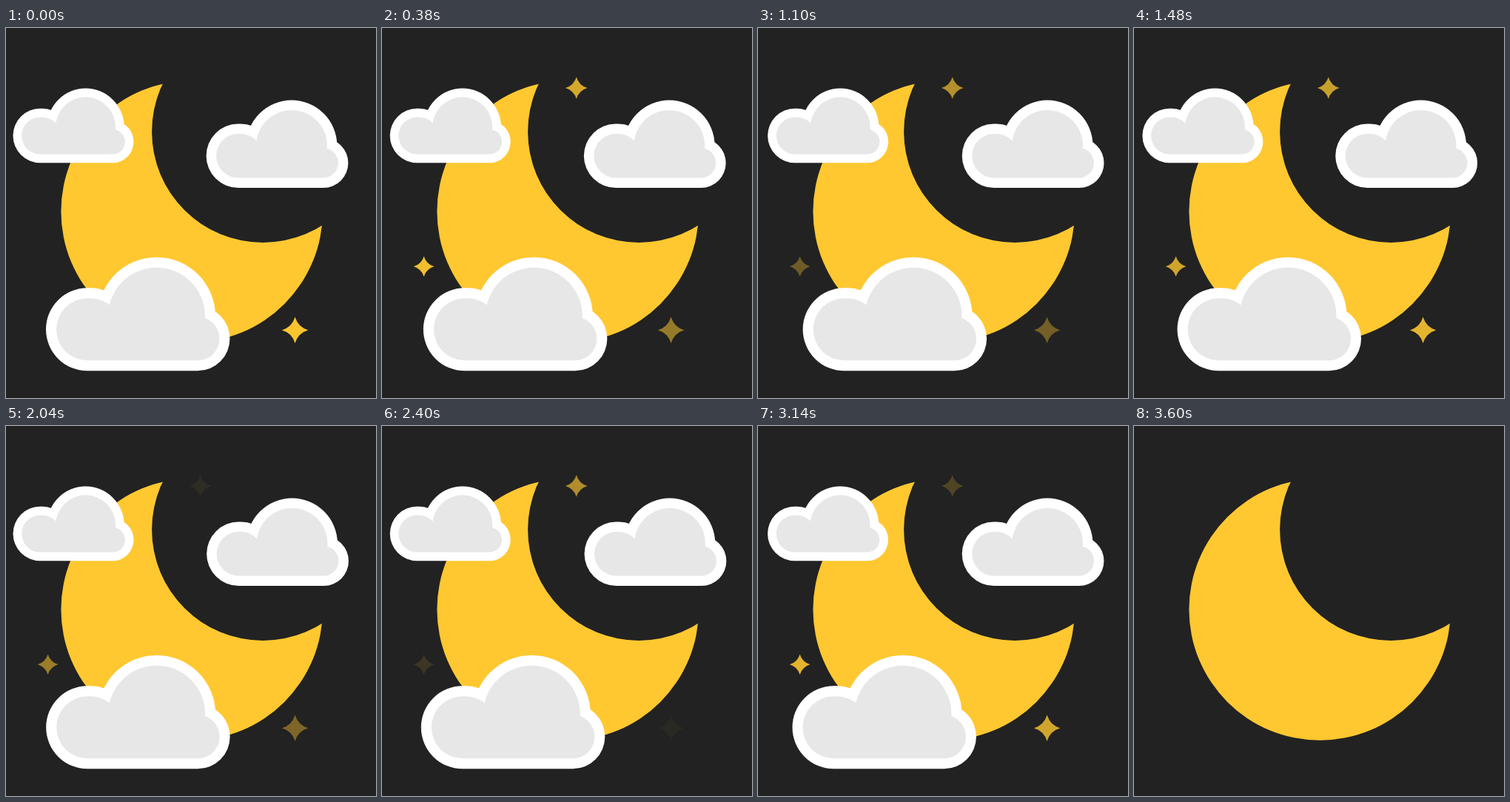
Write an HTML page with a canvas that moves like this. It is 500 px wide and 500 px high and loops after 3620 ms.

```html
<!DOCTYPE html>
<html lang="en">
<head>
<meta charset="utf-8">
<title>Moon and clouds</title>
<style>
  html, body { margin: 0; width: 100%; height: 100%; overflow: hidden; background: #222; }
  canvas { display: block; width: 500px; height: 500px; }
</style>
</head>
<body>
<canvas id="stage" width="500" height="500"></canvas>
<script>
const ctx = document.getElementById('stage').getContext('2d');
const LOOP = 3620, END = 3600, TAU = Math.PI * 2;
const NIGHT = '#222222', GOLD = '#ffc830';

// A cloud leaves home by `first`, is back at `rest`, leaves again by `second`.
const clouds = [
  { home: 9.5, bottom: 182.3, scale: 0.656, border: 11.7, rest: 1980, first: 3.7, second: 3.7 },
  { home: 270.6, bottom: 216, scale: 0.772, border: 13.5, rest: 1800, first: 5.8, second: 5.8 },
  { home: 54, bottom: 463.3, scale: 1, border: 14, rest: 2150, first: 6.6, second: -7.6 }
];

// A star flares once between neighbouring `dark` times, brightest at the `peak` fraction.
const stars = [
  { x: 390.6, y: 408.3, r: 17.7, peak: 0.48, dark: [-800, 830, 2370, 4400] },
  { x: 262.7, y: 81, r: 14.8, peak: 0.4, dark: [0, 740, 2090, 3290] },
  { x: 56.6, y: 322.2, r: 13.8, peak: 0.5, dark: [0, 810, 2500, 3640] }
];

// Eased trip out and back over 0..1, turning round at `peak`.
function swing(k, peak) {
  const leg = k < peak ? k / peak : (1 - k) / (1 - peak);
  return (1 - Math.cos(Math.PI * leg)) / 2;
}

function cloudX({ home, rest, first, second }, t) {
  return t < rest
    ? home + first * swing(t / rest, 1 / 2)
    : home + second * swing((t - rest) / (END - rest), 2 / 3);
}

function brightness({ dark, peak }, t) {
  const next = dark.findIndex(time => time > t);
  if (next < 1) return 0;
  const k = (t - dark[next - 1]) / (dark[next] - dark[next - 1]);
  return Math.min(k / peak, (1 - k) / (1 - peak));
}

function disc(x, y, r, color) {
  ctx.fillStyle = color;
  ctx.beginPath();
  ctx.arc(x, y, r, 0, TAU);
  ctx.fill();
}

function drawMoon() {
  disc(251.2, 247.9, 176.8, GOLD);
  disc(347.1, 140, 150, NIGHT);
}

function puff(x, y, r, from = 0, to = TAU) {
  ctx.moveTo(x + r * Math.cos(from), y + r * Math.sin(from));
  ctx.arc(x, y, r, from, to);
}

function fillCloud(x, bottom, s, inset, color) {
  const left = x + 56 * s, right = x + 205 * s, top = bottom - 74 * s;
  ctx.fillStyle = color;
  ctx.beginPath();
  puff(left, bottom - 56 * s, 56 * s - inset);
  puff(left + 4 * s, bottom - 56 * s, 56 * s - inset);
  puff(x + 149.5 * s, top, 79.5 * s - inset, Math.PI, TAU + 0.1);
  puff(right, bottom - 43.5 * s, 43.5 * s - inset);
  ctx.rect(left, top, right - left, bottom - inset - top);
  ctx.fill();
}

function drawCloud(cloud, t) {
  const x = cloudX(cloud, t);
  fillCloud(x, cloud.bottom, cloud.scale, 0, '#ffffff');
  fillCloud(x, cloud.bottom, cloud.scale, cloud.border, '#e7e7e7');
}

function drawStar(star, t) {
  const { x, y, r } = star, waist = r * 0.23;
  ctx.save();
  ctx.globalAlpha = brightness(star, t);
  ctx.fillStyle = GOLD;
  ctx.translate(x, y);
  ctx.beginPath();
  ctx.moveTo(0, -r);
  ctx.quadraticCurveTo(waist, -waist, r, 0);
  ctx.quadraticCurveTo(waist, waist, 0, r);
  ctx.quadraticCurveTo(-waist, waist, -r, 0);
  ctx.quadraticCurveTo(-waist, -waist, 0, -r);
  ctx.fill();
  ctx.restore();
}

function draw(t) {
  ctx.fillStyle = NIGHT;
  ctx.fillRect(0, 0, 500, 500);
  drawMoon();
  if (t >= END) return;
  stars.forEach(star => drawStar(star, t));
  clouds.forEach(cloud => drawCloud(cloud, t));
}

const start = performance.now();
function tick() {
  draw((performance.now() - start) % LOOP);
  requestAnimationFrame(tick);
}
tick();
</script>
</body>
</html>
```
